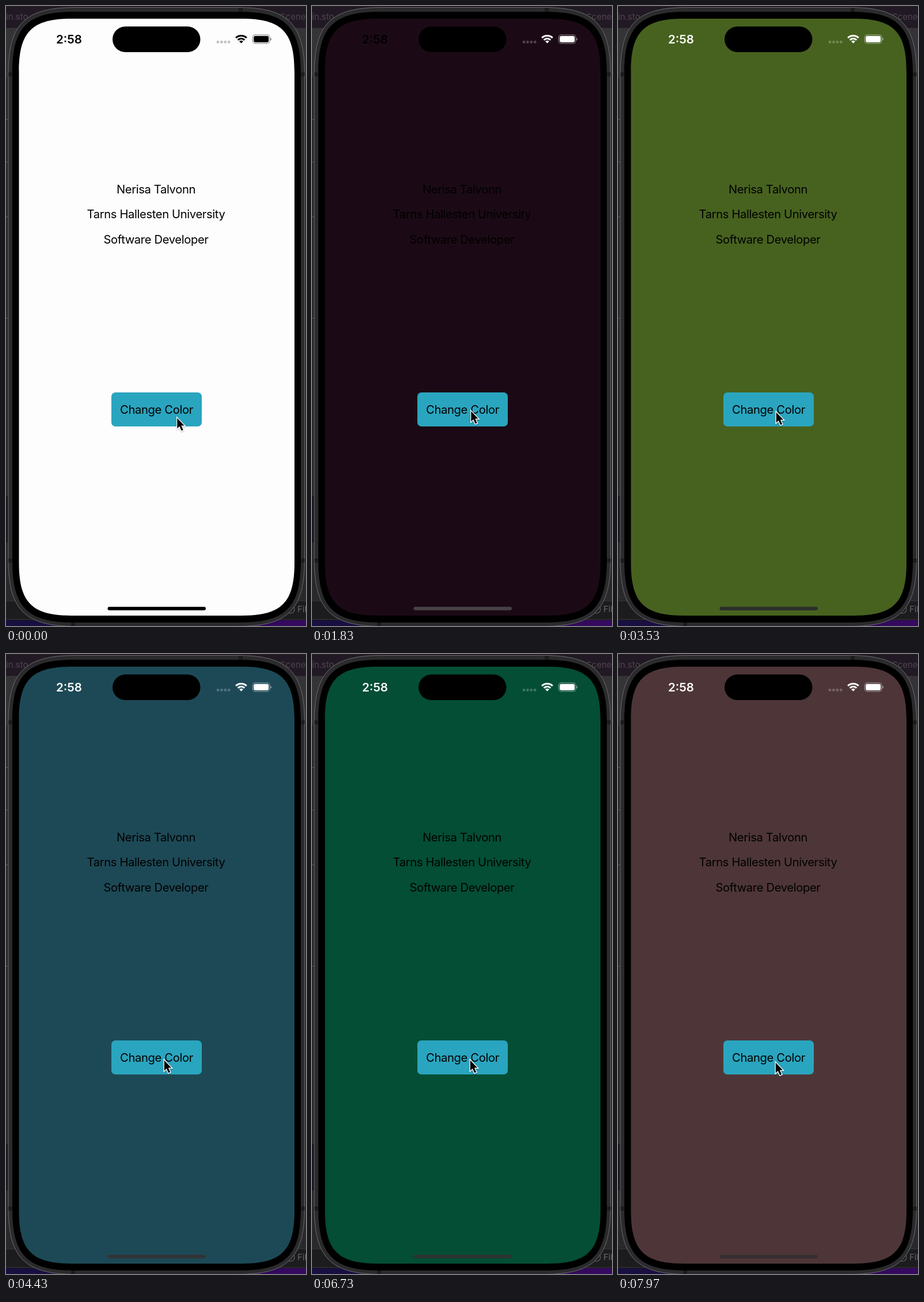
Write an HTML page that moves like this. It is 521 px wide and 1075 px high and loops after 8 s.

```html
<!DOCTYPE html>
<html lang="en">
<head>
<meta charset="utf-8">
<style>
  html, body { margin: 0; width: 100%; height: 100%; overflow: hidden; background: #1c1a1d; }
  svg { display: block; width: 521px; height: 1075px; font-family: Inter, Roboto, sans-serif; }
  .label { font-size: 20.2px; letter-spacing: -.018em; text-anchor: middle; }
</style>
</head>
<body>
<svg viewBox="0 0 521 1075">
  <defs>
    <linearGradient id="desk">
      <stop offset="0" stop-color="#171040"/>
      <stop offset=".5" stop-color="#24083e"/>
      <stop offset="1" stop-color="#360a63"/>
    </linearGradient>
    <filter id="shade" x="-50%" y="-30%" width="200%" height="170%">
      <feDropShadow dx="0" dy="1" stdDeviation="1" flood-opacity=".35"/>
    </filter>
  </defs>

  <!-- windows behind the phone -->
  <rect width="521" height="38" fill="#211923"/>
  <rect y="38" width="521" height="85" fill="#343335"/>
  <rect y="123" width="521" height="908" fill="#29282a"/>
  <rect y="850" width="4" height="80" fill="#1d1620"/>
  <path d="M0 196.500h4M0 270.500h4M0 365.500h4M0 541.500h4" stroke="#555457"/>
  <rect y="1031" width="521" height="33" fill="#1c1b1d"/>
  <path d="M0 1031.500H521M0 1063.500H521" stroke="#343336"/>
  <rect y="1065" width="521" height="10" fill="url(#desk)"/>
  <g fill="#4d444f" font-size="15">
    <text x="0" y="24">in.sto</text>
    <text x="476" y="24">Scene</text>
    <text x="506" y="1051" fill="#666468">Fil</text>
  </g>
  <circle cx="494" cy="1046" r="7" fill="none" stroke="#666468" stroke-width="1.200"/>

  <!-- phone body -->
  <path id="body" fill="#2b2b2d" stroke="#6c6c6e"/>
  <path d="M404 6.500h7M7.500 115v7M515.500 115v7M7.500 958v7M515.500 958v7M113 1072h7" stroke="#1b1b1c" stroke-width="6"/>
  <path id="bezel"/>
  <path id="screen"/>
  <rect x="185" y="35.500" width="152.500" height="44.500" rx="22.250"/>

  <!-- status bar -->
  <text id="clock" x="109.500" y="65" font-size="20.500" font-weight="600" text-anchor="middle">2:58</text>
  <g id="status">
    <g opacity=".23">
      <circle cx="368" cy="62.500" r="2.400"/>
      <circle cx="374.400" cy="62.500" r="2.400"/>
      <circle cx="380.800" cy="62.500" r="2.400"/>
      <circle cx="387.200" cy="62.500" r="2.400"/>
    </g>
    <g fill="none" stroke="currentColor" stroke-width="3">
      <path d="M399.200 55.200a13.300 13.300 0 0 1 18.600 0M402.700 59a8.200 8.200 0 0 1 11.600 0"/>
    </g>
    <path d="M408.500 64.800l-3.400 -3.500a4.800 4.800 0 0 1 6.800 0z"/>
    <rect x="428.300" y="50.200" width="29.800" height="14.600" rx="4.500" fill="none" stroke="currentColor" stroke-width="1.200" opacity=".45"/>
    <rect x="430.200" y="52.100" width="26" height="10.800" rx="2.800"/>
    <path d="M459.400 55v5a2.700 2.700 0 0 0 0 -5z" opacity=".5"/>
  </g>

  <g class="label">
    <text x="260.500" y="325">Nerisa Talvonn</text>
    <text x="260.500" y="368">Tarns Hallesten University</text>
    <text x="260.500" y="411.500">Software Developer</text>
    <rect x="183" y="670" width="157" height="59" rx="7" fill="#2aa5bf"/>
    <text x="261.500" y="707">Change Color</text>
  </g>
  <rect id="home" x="176.500" y="1041.800" width="170.500" height="6" rx="3"/>

  <path id="cursor" d="M1.300 2.500V20.500L5.300 16.800L8.700 24.300L11.700 23L8.400 15.600H13.700Z"
    stroke="#fff" stroke-width="2.600" paint-order="stroke" filter="url(#shade)"/>
</svg>
<script>
const LOOP = 8000;
const CLOCK_SWITCH = 1880; // the clock turns white a little after the icons

// start time, screen colour, home bar colour
const looks = [
  [0, '#fdfdfd', '#000'],
  [1710, '#1b0a15', '#474146'],
  [2620, '#354028', '#383a36'],
  [3500, '#47621f', '#2d2d2d'],
  [4400, '#1d4956', '#333335'],
  [5480, '#1c351a', '#3c3c3c'],
  [6710, '#034e35', '#2c3330'],
  [7720, '#4e3638', '#342f30']
];

// time, x, y of the pointer
const path = [
  [0, 296, 712], [150, 296, 712], [1400, 275, 700], [1900, 275, 700],
  [2900, 273.5, 702], [7000, 273.5, 702], [7800, 272.500, 706], [LOOP, 272.500, 706]
];

const [body, bezel, screenEl, clock, status, home, cursor] =
  ['body', 'bezel', 'screen', 'clock', 'status', 'home', 'cursor'].map(id => document.getElementById(id));

// Rectangle whose corners ease into the sides, as on the device.
function smoothRect(el, x, y, w, h, r) {
  const e = 1.35 * r, k = .331 * r, c = e - k;
  el.setAttribute('d', `M${x + e} ${y}h${w - 2 * e}c${c} 0 ${e} ${k} ${e} ${e}
    v${h - 2 * e}c0 ${c} ${-k} ${e} ${-e} ${e}
    h${2 * e - w}c${-c} 0 ${-e} ${-k} ${-e} ${-e}
    v${2 * e - h}c0 ${-c} ${k} ${-e} ${e} ${-e}z`);
}
smoothRect(body, 4, 2.5, 514.5, 1073, 86);
smoothRect(bezel, 11, 10, 501, 1059, 79);
smoothRect(screenEl, 22.5, 22, 478.5, 1035, 68);

function pointerAt(t) {
  const i = path.findIndex(p => p[0] > t);
  const [t0, x0, y0] = path[i - 1], [t1, x1, y1] = path[i];
  const u = (t - t0) / (t1 - t0), e = u * u * (3 - 2 * u);
  return [x0 + (x1 - x0) * e, y0 + (y1 - y0) * e];
}

function draw(t) {
  const [start, color, bar] = looks.filter(l => l[0] <= t).pop();
  const ink = start ? '#fff' : '#000';
  screenEl.setAttribute('fill', color);
  home.setAttribute('fill', bar);
  status.setAttribute('fill', ink);
  status.style.color = ink;
  clock.setAttribute('fill', t < CLOCK_SWITCH ? '#000' : '#fff');
  cursor.setAttribute('transform', `translate(${pointerAt(t)})`);
}

const begin = performance.now();
function tick() {
  draw((performance.now() - begin) % LOOP);
  requestAnimationFrame(tick);
}
tick();
</script>
</body>
</html>
```
